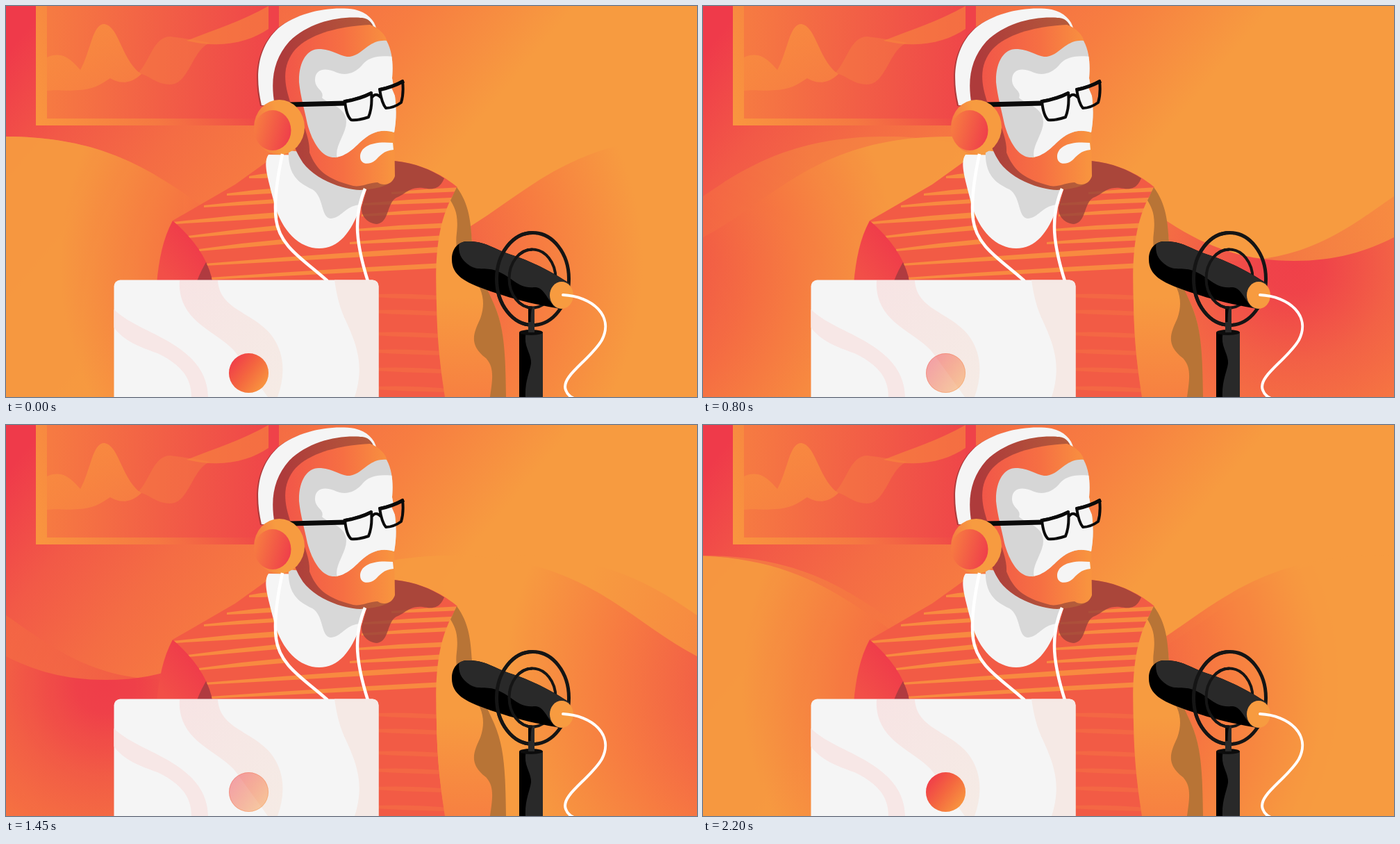
Write an HTML page that moves like this. It is 995x563 px and loops after 2250 ms.

```html
<!DOCTYPE html>
<html lang="en">
<head>
<meta charset="utf-8">
<title>Podcast host</title>
<style>
html, body { margin: 0; width: 100%; height: 100%; overflow: hidden; background: #f79b40; }
svg { display: block; width: 995px; height: 563px; }
</style>
</head>
<body>
<svg viewBox="0 0 995 563" xmlns="http://www.w3.org/2000/svg">
<defs>
  <linearGradient id="wall" gradientUnits="userSpaceOnUse" x1="0" y1="0" x2="481" y2="404">
    <stop offset=".07" stop-color="#ef3a4a"/><stop offset=".28" stop-color="#f25947"/>
    <stop offset=".48" stop-color="#f46c44"/><stop offset=".73" stop-color="#f77d41"/>
    <stop offset="1" stop-color="#f79b40"/>
  </linearGradient>
  <radialGradient id="glow" gradientUnits="userSpaceOnUse" cx="497.5" cy="372" r="420">
    <stop offset="0" stop-color="#ef3a4a"/><stop offset=".1" stop-color="#ef3d4a"/>
    <stop offset=".34" stop-color="#f25d46"/><stop offset=".64" stop-color="#f77941"/>
    <stop offset="1" stop-color="#f79b40"/>
  </radialGradient>
  <linearGradient id="frame" gradientUnits="userSpaceOnUse" x1="50" y1="172" x2="350" y2="60">
    <stop offset="0" stop-color="#f9953f"/><stop offset=".5" stop-color="#f57842"/><stop offset="1" stop-color="#ef4249"/>
  </linearGradient>
  <linearGradient id="canvas" gradientUnits="userSpaceOnUse" x1="60" y1="120" x2="380" y2="135">
    <stop offset="0" stop-color="#f67a42"/><stop offset=".5" stop-color="#f25f46"/><stop offset="1" stop-color="#ef4549"/>
  </linearGradient>
  <linearGradient id="hill" x1="0" y1="0" x2="0" y2="1">
    <stop offset="0" stop-color="#f9913f" stop-opacity=".75"/><stop offset="1" stop-color="#f9913f" stop-opacity=".5"/>
  </linearGradient>
  <linearGradient id="hair" gradientUnits="userSpaceOnUse" x1="400" y1="0" x2="555" y2="0">
    <stop offset="0" stop-color="#f15649"/><stop offset=".55" stop-color="#f66f43"/><stop offset="1" stop-color="#f8933f"/>
  </linearGradient>
  <linearGradient id="cup" x1="0" y1=".6" x2="1" y2=".4">
    <stop offset="0" stop-color="#f57742"/><stop offset=".5" stop-color="#f79b40"/>
  </linearGradient>
  <linearGradient id="pad" x1="0" y1=".3" x2="1" y2=".6">
    <stop offset="0" stop-color="#f77d41"/><stop offset="1" stop-color="#ef3f4a"/>
  </linearGradient>
  <linearGradient id="badge" x1="0" y1=".1" x2="1" y2=".9">
    <stop offset="0" stop-color="#ef344b"/><stop offset=".5" stop-color="#f4683f"/><stop offset="1" stop-color="#f99f3f"/>
  </linearGradient>
  <linearGradient id="sleeve" gradientUnits="userSpaceOnUse" x1="640" y1="420" x2="645" y2="580">
    <stop offset="0" stop-color="#f79b40"/><stop offset="1" stop-color="#f77d41"/>
  </linearGradient>
  <linearGradient id="arm" gradientUnits="userSpaceOnUse" x1="230" y1="390" x2="285" y2="345">
    <stop offset="0" stop-color="#f24f48"/><stop offset="1" stop-color="#ef3a4a"/>
  </linearGradient>
  <linearGradient id="shade" gradientUnits="userSpaceOnUse" x1="400" y1="0" x2="560" y2="0">
    <stop offset="0" stop-color="#ae3b3b"/><stop offset="1" stop-color="#b5623a"/>
  </linearGradient>
  <linearGradient id="blush" x1="0" y1="0" x2="1" y2="1">
    <stop offset="0" stop-color="#f7e4e4"/><stop offset="1" stop-color="#f5ebe5"/>
  </linearGradient>
  <path id="shirtShape" d="M376 224L330 257 240 309Q290 352 298 400L537 563H633Q620 495 620 420 618 320 650 261 612 229 560 223L518 262Z"/>
  <clipPath id="shirtClip"><use href="#shirtShape"/></clipPath>
  <path id="headShape" d="M422 110C421 80 434 62 450 62 471 62 482 74 495 73 515 70 522 48 548 50 558 68 557 90 556 104 561 130 564 155 559 182 540 176 525 182 510 196 500 206 486 219 470 218 452 216 440 192 434 170 430 150 424 130 422 110Z"/>
  <clipPath id="headClip"><use href="#headShape"/></clipPath>
  <path id="bandShape" d="M368 143C358 100 362 60 392 32 422 8 468 0 502 5 523 10 533 24 534 37L520 45 400 143Z"/>
  <path id="micShape" d="M663 339C690 338 700 349 730 359 760 369 790 385 812 400L798 436C760 430 720 419 690 408 662 398 642 388 642 365 642 350 650 340 663 339Z"/>
  <clipPath id="micClip"><use href="#micShape"/></clipPath>
  <path id="wave" fill="url(#glow)" d="M-1 564V188H0C265 188 282 367 497.5 367S730 188 995 188H996V564Z"/>
  <g id="waves"><use href="#wave" x="-995"/><use href="#wave"/></g>
</defs>

<rect width="995" height="563" fill="url(#wall)"/>

<g id="picture">
  <path fill="url(#canvas)" d="M59 0H378V162H59Z"/>
  <path fill="url(#hill)" d="M59 74C82 64 94 78 107 92 122 66 124 27 141 26 163 28 166 78 195 98 180 112 165 113 150 104 135 114 125 120 105 121 85 123 75 120 59 122Z"/>
  <path fill="#f68342" opacity=".4" d="M190 97C208 78 212 45 236 44 256 46 272 49 294 53 268 62 264 113 236 113 215 113 205 98 190 97Z"/>
  <path fill="#f8893f" opacity=".6" d="M260 50C300 34 340 22 378 0V33C350 52 310 62 260 50Z"/>
  <path fill="url(#frame)" d="M43 0H59V162H378V0H393V172H43Z"/>
</g>

<g id="slow" opacity=".42"><use href="#waves"/></g>
<g id="steady" opacity=".9"><use href="#waves"/></g>

<g id="body">
  <path fill="url(#arm)" d="M240 309C226 335 220 365 217 400H299Q296 350 240 309Z"/>
  <path fill="#b03b40" d="M291 364Q281 380 275 396H299Q298 380 291 364Z"/>
  <use href="#shirtShape" fill="#f25b45"/>
  <g id="stripes" clip-path="url(#shirtClip)" fill="#f88a40"></g>
  <path fill="#9c4339" opacity=".82" d="M559 223C590 226 612 236 631 248 624 266 612 264 600 262 580 260 573 273 562 276 548 284 552 312 534 314 520 313 511 302 512 290L520 262Z"/>
  <path fill="url(#sleeve)" d="M650 262C618 310 618 370 620 430 621 490 627 530 632 563H719C718 500 718 465 703 430 684 395 672 370 671 340 668 305 662 278 650 262Z"/>
  <path fill="#b87436" d="M649 261C667 285 669 310 671 340 674 375 690 400 703 430 718 465 719 500 720 563H697C701 535 703 520 691 507 665 487 674 470 683 450 692 425 685 405 671 390 652 370 646 350 649 327 652 300 646 290 640 280Z"/>
</g>

<g id="neck">
  <path fill="#f5f5f5" d="M378 214C370 225 376 245 386 283 397 325 423 349 451 349 485 349 505 315 518 262L450 215Z"/>
  <path fill="#d8d8d8" d="M407 208C405 245 424 256 441 264 458 274 453 304 467 306 484 306 487 287 512 286L519 262 470 215Z"/>
</g>

<g id="head">
  <use href="#bandShape" x="-2" y="1" fill="#ae3b3b"/>
  <use href="#bandShape" fill="#f5f5f5"/>
  <path fill="url(#shade)" d="M387 143C380 105 386 76 408 51 436 23 480 14 513 17 524 18 531 28 530 38L470 90 438 190C444 214 470 245 540 252L557 247C557 259 530 264 510 265 480 264 438 246 424 220 416 207 412 193 411 182Z"/>
  <path fill="url(#hair)" d="M411 143C397 105 400 82 417 62 440 38 485 29 524 27 538 32 547 42 549 52L540 90 440 140Z"/>
  <path fill="url(#hair)" d="M418 143L432 140 440 190 475 219 500 206C524 181 535 171 559 181L560 245C555 259 542 259 535 254 520 255 512 261 500 259 465 250 448 239 437 211 438 190 427 170 418 143Z"/>
  <use href="#headShape" fill="#d6d6d6"/>
  <path fill="#f5f5f5" clip-path="url(#headClip)" d="M445 108C444 90 460 89 472 94 490 103 504 95 512 86 522 72 540 70 565 74V200L478 222C470 205 490 185 490 167 490 145 464 141 455 132 459 122 446 120 445 108Z"/>
  <path fill="#f5f5f5" d="M510 217C510 202 528 194 557 197L558 207C544 208 538 216 532 222 522 230 510 228 510 217Z"/>
  <path fill="#f77c41" d="M554 115L571 109 570 139 566 143Z"/>
  <g fill="none" stroke="#0a0a0a" stroke-linejoin="round">
    <path stroke-width="7" d="M409 142L488 140"/>
    <path stroke-width="4" d="M488 137Q510 133 526 125 528 145 522 160 508 165 497 164 490 158 488 137ZM538 120Q556 117 571 108 573 126 569 139 558 147 547 147 541 140 538 120ZM526 133Q532 123 540 132"/>
    <path stroke-width="5" d="M486 138Q510 134 527 125M537 121Q556 117 573 108"/>
  </g>
  <ellipse cx="393.5" cy="174.500" rx="36.500" ry="39.500" fill="url(#cup)"/>
  <ellipse cx="384" cy="179" rx="26.500" ry="29" fill="url(#pad)"/>
</g>

<g fill="none" stroke="#fff" stroke-width="4.500">
  <path d="M398 213C390 250 386 285 389 308 394 347 430 366 463 396"/>
  <path d="M517 263C499 305 505 345 521 396"/>
</g>

<g id="laptop">
  <rect x="155.5" y="394.500" width="381" height="190" rx="9" fill="#f5f5f5"/>
  <path fill="#f7e7e6" d="M155.5 437C180 460 212 468 245 490 275 510 290 532 291 563H267C267 530 245 513 218 500 190 490 170 482 155.500 463Z"/>
  <path fill="url(#blush)" d="M250 395H305C307 435 350 440 377 468 402 495 403 530 391 563H377L335 505C315 470 246 460 250 395Z"/>
  <path fill="#f5e9e5" d="M473 394.500H528Q536.500 395 536.500 404V563H502C516 520 506 490 491 457 480 435 476 415 473 394.500Z"/>
  <circle cx="349.500" cy="528.500" r="28" fill="none" stroke="#f2a478" stroke-width=".5"/>
  <circle id="lamp" cx="349.500" cy="528.500" r="28.500" fill="url(#badge)"/>
</g>

<g id="mic">
  <g fill="none" stroke="#151515">
    <ellipse cx="758.500" cy="393" rx="52" ry="66.500" stroke-width="5"/>
    <ellipse cx="758" cy="392.500" rx="33.500" ry="42" stroke-width="4"/>
  </g>
  <path fill="#292929" d="M752 434H761V471H752Z"/>
  <path fill="#050505" d="M752 434H757Q754 452 757 471H752Z"/>
  <use href="#micShape" fill="#000"/>
  <g clip-path="url(#micClip)" fill="#292929">
    <path d="M653 338C650 356 655 365 668 374 680 382 692 375 708 382 730 391 737 407 760 405 778 403 780 432 800 440L830 390 740 350 680 330Z"/>
  </g>
  <g fill="none" stroke="#151515">
    <path stroke-width="5" d="M758.500 326.500A52 66.500 0 0 0 758.500 459.500"/>
    <path stroke-width="4" d="M758 350.500A33.500 42 0 0 0 758 434.500"/>
  </g>
  <ellipse cx="800" cy="416.500" rx="17" ry="19.500" fill="#f79b40"/>
  <path fill="#292929" d="M739 470H773V563H739Z"/>
  <path fill="#000" d="M739 470H749C744 490 757 500 756 515 754 528 747 540 748 563H739Z"/>
  <ellipse cx="756" cy="470" rx="17" ry="4" fill="#0c0c0c"/>
  <path fill="#292929" d="M752 455H761V470H752Z"/>
  <path fill="none" stroke="#fff" stroke-width="4" stroke-linecap="round" d="M802 416C844 418 876 446 858 481 842 509 798 533 806 553Q809 561 816 564"/>
</g>
</svg>
<script>
const LOOP = 2250, STEP = 50, WIDTH = 995;
const byId = id => document.getElementById(id);

// Tapered shirt stripes: x1, y1, x2, y2, thickness
const stripes = [
  [350, 245, 384, 244, 7], [318, 270, 388, 266, 7], [285, 287, 388, 281, 6],
  [240, 311, 392, 301, 8], [262, 331, 395, 319, 7], [278, 350, 403, 339, 7],
  [286, 371, 622, 351, 8], [294, 391, 622, 374, 7], [515, 284, 650, 279, 7],
  [512, 300, 640, 294, 6], [505, 321, 632, 316, 7], [495, 340, 626, 334, 7],
  [555, 268, 655, 264, 6]
];
const stripe = ([x1, y1, x2, y2, h]) => {
  const mid = (x1 + x2) / 2, y = (y1 + y2) / 2;
  return `M${x1} ${y1}Q${mid} ${y - h / 2} ${x2} ${y2 - h / 2}V${y2 + h / 2}Q${mid} ${y + h / 2} ${x1} ${y1 + 3}Z`;
};
const faint = [415, 438, 470, 495, 521, 548]
  .map(y => `<path opacity=".25" d="M530 ${y}Q580 ${y - 2} 640 ${y + 3}V${y + 8}Q580 ${y + 7} 530 ${y + 4}Z"/>`);
byId('stripes').innerHTML = `<path d="${stripes.map(stripe).join('')}"/>` + faint.join('');

// Same curve as the CSS ease-in-out keyword
function ease(p) {
  let lo = 0, hi = 1;
  for (let i = 0; i < 24; i++) {
    const s = (lo + hi) / 2, r = 1 - s;
    const x = 3 * r * r * s * .42 + 3 * r * s * s * .58 + s * s * s;
    if (x < p) lo = s; else hi = s;
  }
  return lo * lo * (3 - 2 * lo);
}

const slide = (id, p) => byId(id).setAttribute('transform', `translate(${p * WIDTH})`);

function draw(now) {
  const t = Math.floor(now % LOOP / STEP) * STEP;
  const p = t / LOOP;
  slide('steady', p);
  slide('slow', ease(p));
  const fade = 1 - Math.abs(2 * p - 1);
  byId('lamp').setAttribute('opacity', 1 - .65 * ease(fade));
}

const start = performance.now();
function tick() {
  draw(performance.now() - start);
  requestAnimationFrame(tick);
}
tick();
</script>
</body>
</html>
```
